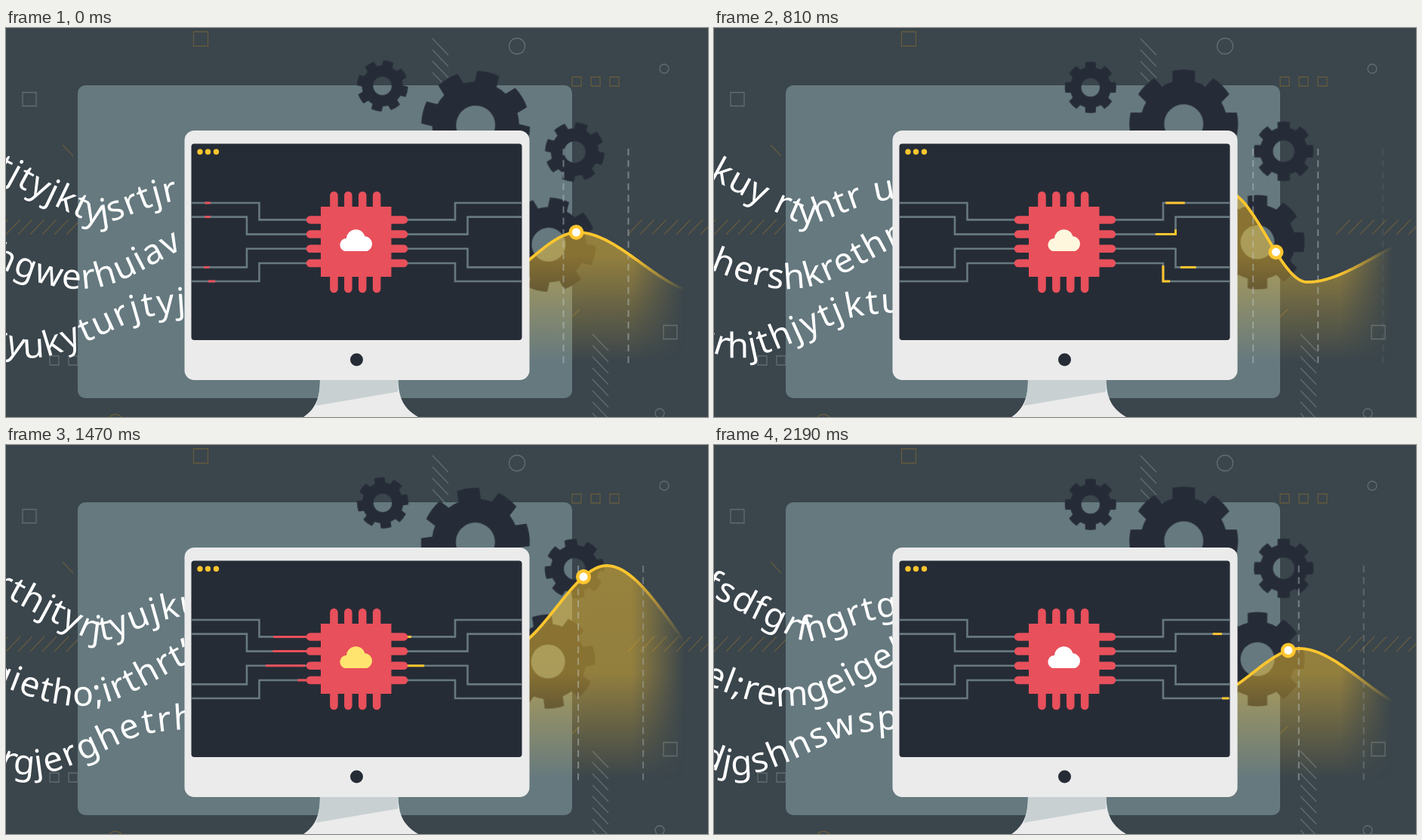
An HTML page that plays this animation: 930 by 516 pixels, repeating every 2.22 s.

```html
<!DOCTYPE html>
<html lang="en">
<head>
<meta charset="utf-8">
<title>Data processing</title>
<style>
html, body { margin: 0; width: 100%; height: 100%; overflow: hidden; background: #3a454c; }
svg { display: block; width: 930px; height: 516px; }
text { font: 46px "Noto Sans", "Open Sans", sans-serif; fill: #fff; }
.line { fill: none; stroke: #606c72; stroke-width: 1.3; }
.gold { stroke: #645b3d; }
.gear { fill: #262c37; fill-rule: evenodd; }
.spin { animation: spin 2220ms steps(74) -3ms infinite; }
.wire { fill: none; stroke: #67797f; stroke-width: 2.6; }
.pulse { fill: none; stroke-width: 3; }
.cloud { animation: glow 2220ms linear -3ms infinite; }
@keyframes spin {
  from { transform: rotate(-211.3deg); }
  to { transform: rotate(367.83deg); }
}
@keyframes glow {
  0%, 13% { fill: #fff; }
  18%, 27% { fill: #ffe56f; }
  36.5% { fill: #fff7dc; }
  41%, 60% { fill: #fff; }
  65%, 72% { fill: #ffe56f; }
  82%, 100% { fill: #fff; }
}
</style>
</head>
<body>
<svg viewBox="0 0 930 516" xmlns="http://www.w3.org/2000/svg">
  <defs>
    <linearGradient id="fade" gradientUnits="userSpaceOnUse" x1="690" y1="0" x2="900" y2="0">
      <stop offset="0" stop-color="#fff"/>
      <stop offset=".66" stop-color="#fff"/>
      <stop offset="1" stop-color="#000"/>
    </linearGradient>
    <linearGradient id="gold" gradientUnits="userSpaceOnUse" x1="0" y1="160" x2="0" y2="445">
      <stop offset="0" stop-color="#ffc62e" stop-opacity=".48"/>
      <stop offset=".5" stop-color="#ffc62e" stop-opacity=".45"/>
      <stop offset=".75" stop-color="#ffc62e" stop-opacity=".22"/>
      <stop offset="1" stop-color="#ffc62e" stop-opacity="0"/>
    </linearGradient>
    <mask id="edge" maskUnits="userSpaceOnUse" x="680" y="0" width="250" height="516">
      <rect x="680" width="250" height="516" fill="url(#fade)"/>
    </mask>
    <path id="way0" d="M-1040 184H-40Q-15 194 0 202L50 229 98 252Q122 265 146 255L190 238Q212 230 262 222"/>
    <path id="way1" d="M-1040 305H-40Q-20 313 0 322C45 340 75 347 100 346C145 345 175 324 237 291L270 275"/>
    <path id="way2" d="M-1040 422H-40Q-15 424 0 431Q30 444 70 431C110 417 140 400 172 387Q200 378 262 376"/>
  </defs>

  <rect width="930" height="516" fill="#3a454c"/>
  <g class="line">
    <path d="M22 85.500h18v18h-18zM871 394.500h18v18h-18zM58 435h12v12h-12zM83 435h12v12h-12z"/>
    <circle cx="677" cy="24" r="10.500"/>
    <circle cx="872" cy="54" r="6"/>
    <circle cx="866" cy="511" r="6"/>
    <path id="hatch"/>
  </g>
  <g class="line gold">
    <path d="M248.500 5h19v19h-19zM750 65h12v12h-12zM775 65h12v12h-12zM800 65h12v12h-12z"/>
    <path d="M75 155l14 15M750 383l10-10"/>
    <circle cx="145" cy="523" r="10.500"/>
    <path id="slashes"/>
  </g>

  <rect x="95" y="76" width="655" height="415" rx="10" fill="#65797f"/>
  <g id="gears"></g>

  <g mask="url(#edge)">
    <path id="area" fill="url(#gold)"/>
    <path id="marks" fill="none" stroke="#c3cccf" stroke-opacity=".45" stroke-width="2" stroke-dasharray="9 6.300"/>
    <path id="curve" fill="none" stroke="#ffc62e" stroke-width="3.800"/>
  </g>
  <g id="dot">
    <circle r="10" fill="#ffc62e"/>
    <circle r="5.500" fill="#fff"/>
  </g>

  <text letter-spacing="1.480"><textPath href="#way0">fsdfgrfhgrtghrthjtyrjtyujkukuy rtyhtr uhrytjtyjktyjsrtjr</textPath></text>
  <text letter-spacing="1.770"><textPath href="#way1">el;remgeigehlgietho;irthrt’ghershkrethnpeihgwerhuiav</textPath></text>
  <text letter-spacing="2.430"><textPath href="#way2">djgshnswspiergjerghetrhtrhjthjytjktuykjtyukyturjtyj</textPath></text>

  <path fill="#ebebeb" d="M416 466H519.500C520 490 526 506 550 518H391C411 506 416 490 416 466z"/>
  <path fill="#c8d0d2" d="M416 466H519.500L519 482.500 410.500 501Q416 486 416 466z"/>
  <rect x="236.500" y="136" width="457" height="331" rx="13" fill="#ebebeb"/>
  <rect x="245.500" y="153.500" width="438" height="260.500" rx="4" fill="#262c36"/>
  <path stroke="#ffc62e" stroke-width="7.400" stroke-linecap="round" d="M257 164.300h0M267.500 164.300h0M278.500 164.300h0"/>
  <circle cx="464.500" cy="440" r="8.500" fill="#262c36"/>

  <g id="wires"></g>
  <path id="pins" stroke="#e8505b" stroke-width="10.500" stroke-linecap="round"/>
  <rect x="417" y="237" width="93.500" height="93" fill="#e8505b"/>
  <path class="cloud" d="M448 296A8.800 8.800 0 0 1 451 279A12.500 12.500 0 0 1 475.500 276.300A10.200 10.200 0 0 1 478.500 296z"/>
</svg>

<script>
const LOOP = 2220, STEP = 30, SCROLL = .4547;
const $ = id => document.getElementById(id);
const set = (id, d) => $(id).setAttribute("d", d);
const repeat = (n, fn) => Array.from({ length: n }, (_, i) => fn(i)).join("");

function add(parent, tag, attrs) {
  const el = document.createElementNS("http://www.w3.org/2000/svg", tag);
  for (const k in attrs) el.setAttribute(k, attrs[k]);
  return parent.appendChild(el);
}

// Background hatching
set("hatch", repeat(4, i => `M565 ${14 + i * 15}l21 22`) + repeat(8, i => `M777 ${406 + i * 15}l21 22`));
set("slashes", repeat(7, i => `M${i * 16 - 16} 274l19 -20`) + repeat(8, i => `M${824 + i * 16} 274l19 -20`));

// Unit gear with eight teeth and a hole
function gearPath() {
  const at = (deg, r) => {
    const a = (deg - 90) * Math.PI / 180;
    return `${r * Math.cos(a)} ${r * Math.sin(a)}`;
  };
  const tooth = a => `${at(a - 15, .8)}L${at(a - 12, 1)}A1 1 0 0 1 ${at(a + 12, 1)}L${at(a + 15, .8)}A.8 .8 0 0 1 `;
  return "M" + repeat(8, i => tooth(i * 45)) + at(-15, .8) + "zM.36 0A.36 .36 0 1 0 -.36 0A.36 .36 0 1 0 .36 0z";
}

// Centre, radius and the small offset that makes each wheel wobble
const outline = gearPath();
[
  [499, 77.8, 34, -.2, 1],
  [622, 128, 72, .3, -.8],
  [754, 163.8, 39.5, .8, -.3],
  [719, 285.6, 62.5, 1, -1.5]
].forEach(([x, y, r, dx, dy]) => {
  const hub = add($("gears"), "g", { transform: `translate(${x} ${y})` });
  const wheel = add(hub, "g", { class: "spin" });
  add(wheel, "path", { class: "gear", d: outline, transform: `translate(${dx} ${dy}) scale(${r})` });
});

// Chip pins and circuit wires, mirrored around the chip
const RED_SPEED = [.29, .29, .272, .365], YELLOW_START = [371, 480, 305, 440];
const pulses = [];
set("pins", repeat(4, i => {
  const k = i - 1.5;
  return `M${462.8 + 18.9 * k} 222V346M403 ${283.2 + 19.2 * k}H527`;
}));
for (let i = 0; i < 4; i++) {
  const k = i - 1.5, outer = Math.abs(k) > 1;
  const pin = 283.2 + 19.2 * k;
  const y = 284 + Math.sign(k) * (outer ? 52 : 33.4);
  const bend = outer ? 335.5 : 319;
  const pulse = (d, stroke, tail, head) => {
    add($("wires"), "path", { class: "wire", d });
    pulses.push({ tail, head, el: add($("wires"), "path", { class: "pulse", d, stroke }) });
  };
  const v = RED_SPEED[i], s = YELLOW_START[i];
  pulse(`M246 ${y}H${bend}V${pin}H399`, "#e8505b", u => v * (u + 60), u => 1.43 * v * (u + 60));
  pulse(`M532 ${pin}H${930.5 - bend}V${y}H683`, "#ffc62e", u => .33 * (u - s - 170), u => .26 * (u - s));
}

// The circuit runs twice per loop
function drawPulses(t) {
  const u = t < 1020 ? t : t - 1080;
  for (const { el, tail, head } of pulses) {
    const from = Math.max(0, tail(u)), size = head(u) - from;
    el.setAttribute("visibility", size > 0 ? "visible" : "hidden");
    el.setAttribute("stroke-dasharray", `0 ${from} ${Math.max(0, size)} 999`);
  }
}

// Chart: eased between its turning points, scrolling to the left
const turns = [
  [640, 335], [757, 271], [925, 352], [1047, 217], [1154, 337],
  [1330, 272], [1464, 160], [1650, 333], [1771, 270], [1935, 352]
];
function height(x) {
  const i = turns.findIndex(p => p[0] >= x);
  const [[x0, y0], [x1, y1]] = [turns[i - 1], turns[i]];
  const u = (x - x0) / (x1 - x0);
  return y0 + (y1 - y0) * u * u * (3 - 2 * u);
}

function drawChart(t) {
  const shift = SCROLL * t;
  const line = "M" + repeat(113, i => `${i ? "L" : ""}${686 + i * 2} ${height(686 + i * 2 + shift).toFixed(2)}`);
  set("curve", line);
  set("area", line + "V450H686z");
  const first = 680 + (58.5 - shift % 86 + 86) % 86;
  set("marks", repeat(3, i => `M${first + i * 86} 160V445`));
  // The dot leans towards the higher side of the curve
  const slope = (height(767 + shift) - height(747 + shift)) / 20;
  const x = 755 - 11 * Math.tanh(slope * 1.5);
  $("dot").setAttribute("transform", `translate(${x} ${height(x + shift)})`);
}

const texts = [...document.querySelectorAll("textPath")];
const TEXT_SPEED = [.438, .46, .435], TEXT_END = [1026, 1026, 1020];

function draw(t) {
  texts.forEach((el, i) => el.setAttribute("startOffset", TEXT_END[i] - TEXT_SPEED[i] * (2190 - t)));
  drawPulses(t);
  drawChart(t);
}

let start;
function tick(now) {
  start ??= now;
  draw(Math.floor((now - start + 3) % LOOP / STEP) * STEP);
  requestAnimationFrame(tick);
}
draw(0);
requestAnimationFrame(tick);
</script>
</body>
</html>
```
